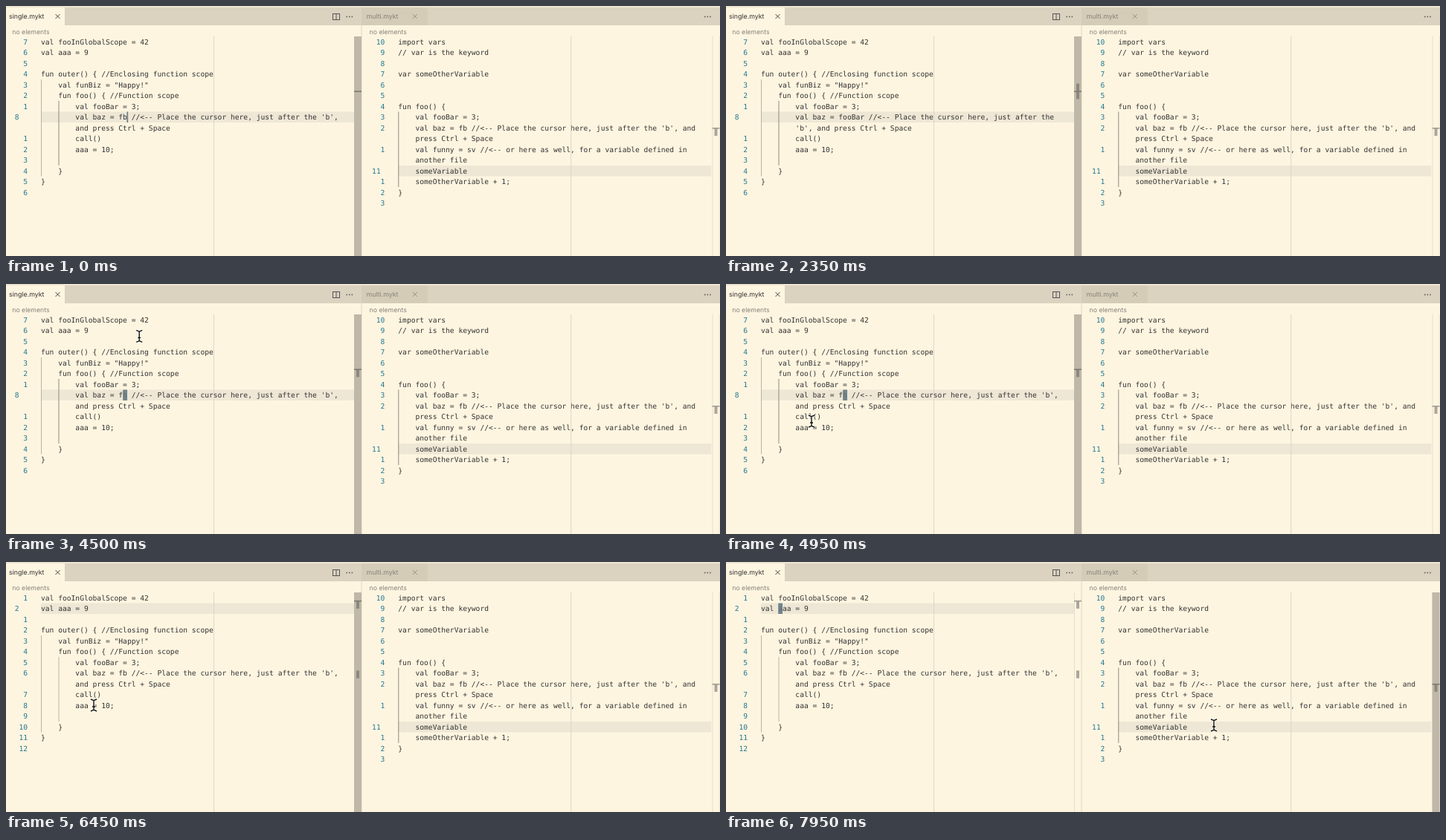
Recreate the animation shown at these times as an HTML page with a canvas. Size 960x337 px, loop 8 s.

```html
<!DOCTYPE html>
<html lang="en">
<head>
<meta charset="utf-8">
<title>Editor completion and go to definition</title>
<style>
  html, body { margin: 0; height: 100%; overflow: hidden; background: #fef5e0; }
  canvas { display: block; }
</style>
</head>
<body>
<canvas id="stage" width="960" height="337"></canvas>
<script>
const ctx = document.getElementById("stage").getContext("2d");
ctx.textRendering = "geometricPrecision";

const LOOP = 8000, STEP = 50;
const TOP = 41, ROW = 14.5, CHAR = 5.8, CODE_X = 47, PANE_X = 480.3;
const MONO = '9.634px "DejaVu Sans Mono", monospace';
const UI = "Inter, sans-serif";
const BG = "#fef5e0", TEXT = "#333333", NUMBER = "#237893", LINE_BG = "#eee7d5";
const SLIDER = "#bfb7a8", GOLD = "#b58900", CURSOR = "#657b83";

// Each scene: caret place, inserted word, and when its word marks show up in the ruler.
const scenes = [
  { at: 0,    line: 8,  col: 20, word: "fb",     blink: -105, marks: [8],     marksAt: 150 },
  { at: 1850, line: 8,  col: 24, word: "fooBar", blink: 1830, marks: [7, 8],  marksAt: 2150 },
  { at: 3050, line: 8,  col: 20, word: "fb",     blink: 3050, marks: [8],     marksAt: 3300 },
  { at: 3500, line: 8,  col: 19, word: "fb",     blink: 3500, marks: [8],     marksAt: 3750, block: true },
  { at: 5300, line: 10, col: 10, word: "fb",     blink: 5300, marks: [2, 10], marksAt: 5550, block: true },
  { at: 5750, line: 2,  col: 4,  word: "fb",     blink: 5765, marks: [2, 10], marksAt: 6050, block: true },
];

const mousePath = [
  [4450, 190, 53], [4700, 136, 140], [4950, 115, 185], [5250, 108, 192], [5300, 108, 192],
  [5600, 118, 193], [6450, 118, 193], [6750, 620, 60], [7050, 620, 60],
  [7300, 672, 202], [7500, 674, 207], [7700, 674, 207], [7950, 656, 220],
];

// Every entry is one logical line; an array holds its wrapped rows.
function leftCode(word) {
  const head = `        val baz = ${word} //<-- Place the cursor here, just after the`;
  const tail = "and press Ctrl + Space";
  const wrapped = word === "fb"
    ? [head + " 'b',", "        " + tail]
    : [head, "        'b', " + tail];
  return [
    "val fooInGlobalScope = 42", "val aaa = 9", "",
    "fun outer() { //Enclosing function scope",
    '    val funBiz = "Happy!"',
    "    fun foo() { //Function scope",
    "        val fooBar = 3;", wrapped,
    "        call()", "        aaa = 10;", "", "    }", "}", "",
  ];
}
const rightCode = [
  "import vars", "// var is the keyword", "", "var someOtherVariable", "", "",
  "fun foo() {", "    val fooBar = 3;",
  ["    val baz = fb //<-- Place the cursor here, just after the 'b', and", "    press Ctrl + Space"],
  ["    val funny = sv //<-- or here as well, for a variable defined in", "    another file"],
  "    someVariable", "    someOtherVariable + 1;", "}", "",
];

function rect(x, y, w, h, color) {
  ctx.fillStyle = color;
  ctx.fillRect(x, y, w, h);
}

function text(str, x, y, color, font = MONO, align = "left") {
  ctx.font = font;
  ctx.fillStyle = color;
  ctx.textAlign = align;
  ctx.fillText(str, x, y);
}

function stroke(points, color, width) {
  ctx.beginPath();
  points.forEach(([x, y], i) => i % 2 ? ctx.lineTo(x, y) : ctx.moveTo(x, y));
  ctx.strokeStyle = color;
  ctx.lineWidth = width;
  ctx.stroke();
}

const rowTop = row => TOP + ROW * row;
const baseline = row => rowTop(row) + 10.7;

function drawCode(left, lines, current) {
  let row = 0;
  lines.forEach((entry, i) => {
    const line = i + 1;
    if (line === current) {
      rect(left + CODE_X, rowTop(row), 421, ROW, LINE_BG);
      text(String(line), left + 11.8, baseline(row), NUMBER);
    } else {
      text(String(Math.abs(line - current)), left + 29, baseline(row), NUMBER, MONO, "right");
    }
    for (const part of [].concat(entry)) text(part, left + CODE_X, baseline(row++), TEXT);
  });
}

function guide(x, fromRow, toRow, active) {
  rect(x, rowTop(fromRow), 1, rowTop(toRow) - rowTop(fromRow), active ? "#8f8a80" : "#bab4a7");
}

function closeIcon(x, color) {
  stroke([[x - 3, 11], [x + 3, 17], [x + 3, 11], [x - 3, 17]], color, 1);
}

function dots(x) {
  for (let i = -1; i <= 1; i++) rect(x + i * 3.6 - 0.7, 13.7, 1.5, 1.5, "#555");
}

function drawChrome() {
  rect(0, 0, 960, 337, BG);
  rect(0, 0, 960, 2, "#eee5d2");
  rect(0, 2, 960, 24, "#dbd2bf");
  rect(0, 2, 79, 24, BG);
  rect(478, 2, 89, 24, "#d5ccb8");
  text("single.mykt", 4, 17.3, "#333", `8.8px ${UI}`);
  text("multi.mykt", 484.5, 17.3, "#85817a", `8.8px ${UI}`);
  closeIcon(69.5, "#444");
  closeIcon(549.8, "#999283");
  ctx.strokeStyle = "#555";
  ctx.lineWidth = 1;
  ctx.strokeRect(439.5, 10.5, 9, 8);
  rect(443.5, 10, 1, 9, "#555");
  dots(461.7);
  dots(943.3);
  for (const x of [8.3, 488.6]) text("no elements", x, 37.5, "#85817a", `8.7px ${UI}`);
}

// Overview ruler with slider, cursor bar and word marks.
function drawRuler(x, slider, cursorRow, markRows) {
  const y = row => 42 + row * 10.43;
  rect(x, TOP, 1, 296, "#e6decc");
  rect(x + 9, TOP, 1, 296, "#eee6d4");
  if (slider) rect(x, TOP, 10, 296, SLIDER);
  const ink = slider ? "#8b8880" : "#aaa69c";
  for (const row of markRows) rect(x + 3, y(row), 4, 10.4, ink);
  rect(x, y(cursorRow) - 0.6, 10, 1.6, slider ? "#7d7a73" : "#a09c93");
}

function drawPopup() {
  rect(163, 157, 299, 46.5, "#d3cbb9");
  rect(164, 158, 297, 44.5, LINE_BG);
  rect(164, 158, 297, 14.3, "#e8daae");
  const items = [["fooBar", "fB"], ["funBiz", "fB"], ["fooInGlobalScope", "fb"]];
  items.forEach(([label, hits], i) => {
    const y = 168.6 + i * ROW;
    text("abc", 165.5, y - 1, "#555", `6.3px ${UI}`);
    [...label].forEach((ch, k) => {
      const hit = k === 0 || ch === hits[1];
      text(ch, 179.3 + k * CHAR, y, hit ? GOLD : TEXT, hit ? "bold " + MONO : MONO);
    });
  });
}

function drawCaret(scene, row, t) {
  if (Math.floor((t - scene.blink) / 485) % 2 === 1) return;
  const x = CODE_X + scene.col * CHAR;
  ctx.globalAlpha = scene.block ? 0.9 : 1;
  rect(scene.block ? x : x - 0.5, rowTop(row), scene.block ? CHAR : 1.6, ROW, CURSOR);
  ctx.globalAlpha = 1;
}

function drawMouse(t) {
  if (t < mousePath[0][0]) return;
  const next = mousePath.findIndex(p => p[0] > t);
  const b = next < 0 ? mousePath.at(-1) : mousePath[next];
  const a = next < 0 ? b : mousePath[next - 1];
  const k = next < 0 ? 0 : (t - a[0]) / (b[0] - a[0]);
  const x = a[1] + (b[1] - a[1]) * k, y = a[2] + (b[2] - a[2]) * k;
  const beam = [
    [x, y - 6.5], [x, y + 6.5],
    [x - 4, y - 8], [x, y - 6.3], [x + 4, y - 8], [x, y - 6.3],
    [x - 4, y + 8], [x, y + 6.3], [x + 4, y + 8], [x, y + 6.3],
    [x - 2, y + 2], [x + 2, y + 2],
  ];
  stroke(beam, "#fffdf6", 3);
  stroke(beam, "#111", 1.4);
}

function draw(t) {
  const scene = scenes.findLast(s => s.at <= t);
  const lineRow = line => line > 8 ? line : line - 1;
  const row = lineRow(scene.line);

  drawChrome();
  drawCode(0, leftCode(scene.word), scene.line);
  drawCode(PANE_X, rightCode, 11);
  guide(47, 4, 13, false);
  guide(70.5, 6, 12, scene.line > 6);
  guide(527.3, 7, 14, true);
  rect(279, TOP, 1, 296, "#dcd6ca");
  rect(759.3, TOP, 1, 296, "#dcd6ca");
  rect(477.5, 26, 1, 311, "#ddd5c3");

  const marks = t >= scene.marksAt ? scene.marks.map(lineRow) : [];
  drawRuler(468, t < 6950, row, marks);
  drawRuler(949.5, t >= 6600, 11.75, [11.75]);
  drawCaret(scene, row, t);
  if (t >= 350 && t < 1850) drawPopup();
  drawMouse(t);
}

const start = performance.now();
function frame() {
  const t = (performance.now() - start) % LOOP;
  draw(Math.floor(t / STEP) * STEP);
  requestAnimationFrame(frame);
}
frame();
</script>
</body>
</html>
```
